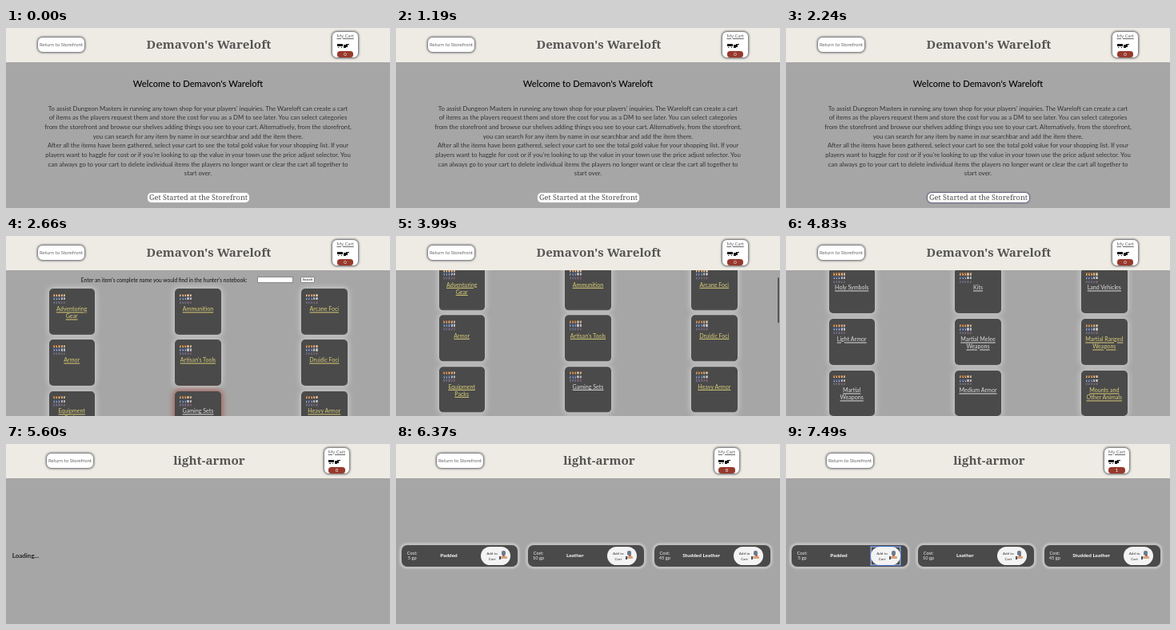
These frames come from a looping animation (480x226 px, 8000 ms). An HTML page:

```html
<!DOCTYPE html>
<html lang="en">
<head>
<meta charset="utf-8">
<title>Shop</title>
<style>
html, body { margin: 0; width: 100%; height: 100%; overflow: hidden; background: #a6a6a6; }
#stage { position: absolute; left: 0; top: 0; width: 480px; height: 226px; overflow: hidden; background: #a6a6a6;
  font: 400 7px Lato, "Open Sans", sans-serif; color: #222; }
#stage div { position: absolute; box-sizing: border-box; }
.page { left: 0; top: 0; width: 480px; height: 226px; }
.t { white-space: pre; line-height: 1; transform: translate(-50%, -50%); }
.head { background: #eeebe4; }
.title { font: 600 15.2px/1 "Noto Serif", serif; color: #555553; }
.panel { background: #fff; border: 1.5px solid #8b8b8b; border-radius: 7px; box-shadow: 0 0 2px 1px #a5a5a3; }
.small { font-size: 6.1px; color: #666; }
.cart { font-size: 6px; text-decoration: underline .5px; color: #666; }
.badge { background: #97392c; border-radius: 3.5px; }
.count { color: #fff; font-size: 6px; }
.welcome { font-size: 11.2px; font-weight: 500; color: #000; }
.body { font-size: 7.8px; color: #333; }
.start { background: #fff; border-radius: 5px; }
.startText { font: 500 9.2px/1 "Noto Serif", serif; color: #505050; }
.label { font-size: 6.6px; color: #111; }
.field { background: #fff; border: .5px solid #888; }
.search { background: #f2f2f2; border: .5px solid #888; border-radius: 1px; }
.tiny { font-size: 4.2px; color: #222; }
.card { background: #4a4a4a; border-radius: 5px; box-shadow: 0 0 6px 2px #c6c6c6; }
.link { font-size: 7.1px; color: #d9cd78; text-decoration: underline .5px; text-underline-offset: 1px; }
.white { color: #ddd; }
.bar { background: #555; border-radius: 2px; }
.loading { font-size: 8px; font-weight: 700; color: #222; }
.item { background: #4a4a4a; border-radius: 7px; box-shadow: 0 0 0 2.4px #bebebe, 0 0 2px 3px #bebebe; }
.price { font-size: 5.7px; color: #eee; }
.name { font-size: 6.4px; font-weight: 700; color: #fff; }
.add { background: #f3f3f3; border-radius: 12px; }
.addText { font-size: 4.6px; color: #333; }
.focus { border: 1px solid #4c78c8; box-shadow: inset 0 0 0 .6px #dfe6f5; }
</style>
</head>
<body>
<div id="stage"></div>
<script>
const LOOP = 8000;
const stage = document.getElementById('stage');

function box(parent, cls, x, y, w, h) {
  const e = document.createElement('div');
  e.className = cls;
  Object.assign(e.style, { left: x + 'px', top: y + 'px', width: w + 'px', height: h + 'px' });
  parent.append(e);
  return e;
}

// Text centred on a point
function text(parent, cls, x, y, str) {
  const e = document.createElement('div');
  e.className = 't ' + cls;
  e.style.left = x + 'px';
  e.style.top = y + 'px';
  e.textContent = str;
  parent.append(e);
  return e;
}

function fill(parent, color, x, y, w, h, r = 0) {
  const e = box(parent, '', x, y, w, h);
  e.style.background = color;
  e.style.borderRadius = r + 'px';
}

function page() {
  return box(stage, 'page', 0, 0, 480, 226);
}

// steps: [ms, value]; hold keeps each value until the next step
function play(e, prop, steps, hold = true) {
  const all = steps[0][0] ? [[0, steps[0][1]], ...steps] : [...steps];
  all.push([LOOP, all[all.length - 1][1]]);
  e.animate(all.map(([ms, v]) => ({
    offset: ms / LOOP, [prop]: v, easing: hold ? 'steps(1, end)' : 'linear'
  })), { duration: LOOP, iterations: Infinity });
}

function show(e, from, to) {
  const steps = [[0, from ? 0 : 1]];
  if (from) steps.push([from, 1]);
  if (to < LOOP) steps.push([to, 0]);
  play(e, 'opacity', steps);
}

function header(parent, title, titleX, backX, cartX) {
  box(parent, 'head', 0, 0, 480, 42.5);
  box(parent, 'panel', backX, 11, 60, 19.5);
  text(parent, 'small', backX + 30, 21, 'Return to Storefront');
  text(parent, 'title', titleX, 20.5, title);
  box(parent, 'panel', cartX, 4, 33.5, 34);
  text(parent, 'cart', cartX + 16.8, 9.5, 'My Cart');
  const x = cartX + 6.7;
  [[0, 19.5, 7, 3.5], [1, 23.5, 1.4, 1.4], [4.5, 23.5, 1.4, 1.4],
   [7.5, 20.5, 3, 4], [10.5, 19.5, 4, 1.5], [11, 21, 2, 3]]
    .forEach(([a, b, w, h]) => fill(parent, '#111', x + a, b, w, h));
  box(parent, 'badge', cartX + 6.5, 29, 20.5, 7.5);
  return text(parent, 'count', cartX + 16.8, 32.8, '0');
}

function shelfIcon(parent, x, y) {
  const rows = [['#c9803f', '#d3ac84'], ['#566b9f', '#b5b8c6'], ['#62647a', '#6d5a68']];
  rows.forEach(([a, b], r) => {
    for (let i = 0; i < 5; i++) {
      const px = x + i * 3.2, py = y + r * 4.6;
      fill(parent, i < 3 ? a : b, px, py, 2.2, 3.3, 1);
      fill(parent, r == 2 ? '#817482' : '#d9cfbf', px + .6, py + 1.9, 1, 1.2);
    }
  });
}

// Welcome
const home = page();
text(home, 'welcome', 240, 70, "Welcome to Demavon's Wareloft");
["To assist Dungeon Masters in running any town shop for your players' inquiries. The Wareloft can create a cart",
 'of items as the players request them and store the cost for you as a DM to see later. You can select categories',
 'from the storefront and browse our shelves adding things you see to your cart. Alternatively, from the storefront,',
 'you can search for any item by name in our searchbar and add the item there.',
 'After all the items have been gathered, select your cart to see the total gold value for your shopping list. If your',
 "players want to haggle for cost or if you're looking to up the value in your town use the price adjust selector. You",
 'can always go to your cart to delete individual items the players no longer want or clear the cart all together to',
 'start over.'].forEach((line, i) => text(home, 'body', 240, 101.5 + i * 11.7, line));
const start = box(home, 'start', 177, 207, 127, 12);
text(home, 'startText', 240.5, 212.5, 'Get Started at the Storefront');
play(start, 'boxShadow', [
  [0, '0 0 1px 0 #ddd'], [1890, '0 0 1px .5px #88889a'], [1960, '0 0 1.5px 1px #5d5d78']
]);
show(home, 0, 2380);

// Storefront
const store = page();
const list = box(store, '', 0, 0, 480, 700);
text(list, 'label', 197.5, 54.5, "Enter an item's complete name you would find in the hunter's notebook:");
box(list, 'field', 314, 50.5, 45, 8.5);
box(list, 'search', 368, 51, 18, 8);
text(list, 'tiny', 377, 55, 'Search');

const kinds = [
  'Adventuring|Gear', 'Ammunition', 'Arcane Foci',
  'Armor', "Artisan's Tools", 'Druidic Foci',
  'Equipment|Packs', 'Gaming Sets*', 'Heavy Armor',
  'Holy Symbols*', 'Kits*', 'Land Vehicles*',
  'Light Armor*', 'Martial Melee|Weapons*', 'Martial Ranged|Weapons',
  'Martial|Weapons*', 'Medium Armor*', 'Mounts and|Other Animals'
];
const cards = kinds.map((kind, i) => {
  const x = 53.5 + i % 3 * 157.8, y = 66 + Math.floor(i / 3) * 64.3;
  const card = box(list, 'card', x, y, 57.5, 57.5);
  shelfIcon(list, x + 5.5, y + 6.5);
  const cls = kind.endsWith('*') ? 'link white' : 'link';
  kind.replace('*', '').split('|').forEach((s, n) => text(list, cls, x + 28.7, y + 25.5 + n * 9, s));
  return card;
});
const calm = '0 0 6px 2px #c6c6c6', warm = '0 0 6px 2px #a8675f';
play(cards[7], 'boxShadow', [[0, calm], [2590, calm], [2660, warm], [3920, warm], [3990, calm]], false);
play(cards[12], 'boxShadow', [[0, calm], [4830, calm], [4900, warm]], false);

const scroll = [[3850, 0], [3920, 8], [3990, 30], [4060, 74], [4130, 118], [4200, 155],
  [4270, 184], [4340, 205], [4410, 219]];
play(list, 'transform', scroll.map(([ms, s]) => [ms, `translateY(${-s}px)`]), false);
const bar = box(store, 'bar', 476.7, 43, 2.6, 57);
play(bar, 'transform', scroll.map(([ms, s]) => [ms, `translateY(${s * .3}px)`]), false);
play(bar, 'opacity', [[0, 0], [3850, 0], [3920, 1], [4480, 1], [4690, 0]], false);
show(store, 2590, 5600);

const wait = page();
text(wait, 'loading', 24.5, 140, 'Loading...');
play(wait, 'opacity', [[0, 0], [2380, 1], [2590, 0], [5600, 1], [5740, 0]]);

const mainHead = page();
header(mainHead, "Demavon's Wareloft", 253.5, 39, 407.3);
show(mainHead, 0, 5600);

// Category
const sub = page();
const count = header(sub, 'light-armor', 254, 50, 396.6);
const one = text(sub, 'count', 413.4, 32.8, '1');
show(count, 0, 6860);
show(one, 6860, LOOP);
show(sub, 5600, LOOP);

const shop = page();
[['Padded', 5], ['Leather', 10], ['Studded Leather', 45]].forEach(([name, gp], i) => {
  const x = i * 157.8;
  box(shop, 'item', x + 7, 127, 145, 26.5);
  text(shop, 'price', x + 20.3, 137.2, 'Cost:');
  text(shop, 'price', x + 20.3, 143.2, gp + ' gp');
  text(shop, 'name', x + 66, 140.3, name);
  box(shop, 'add', x + 106, 129, 37, 23);
  text(shop, 'addText', x + 120, 137.2, 'Add to');
  text(shop, 'addText', x + 120, 143.5, 'Cart');
  fill(shop, '#687d91', x + 131.5, 134, 5, 5.5, 2);
  fill(shop, '#b3533f', x + 133, 138.5, 3, 2.5, 1);
  fill(shop, '#d6a57f', x + 130, 141, 8.5, 2.5, 1);
  fill(shop, '#41536b', x + 128.8, 140.5, 2, 4.5);
});
show(shop, 5740, LOOP);
const focus = box(shop, 'focus', 105, 128, 39, 25);
show(focus, 6790, LOOP);
</script>
</body>
</html>
```
